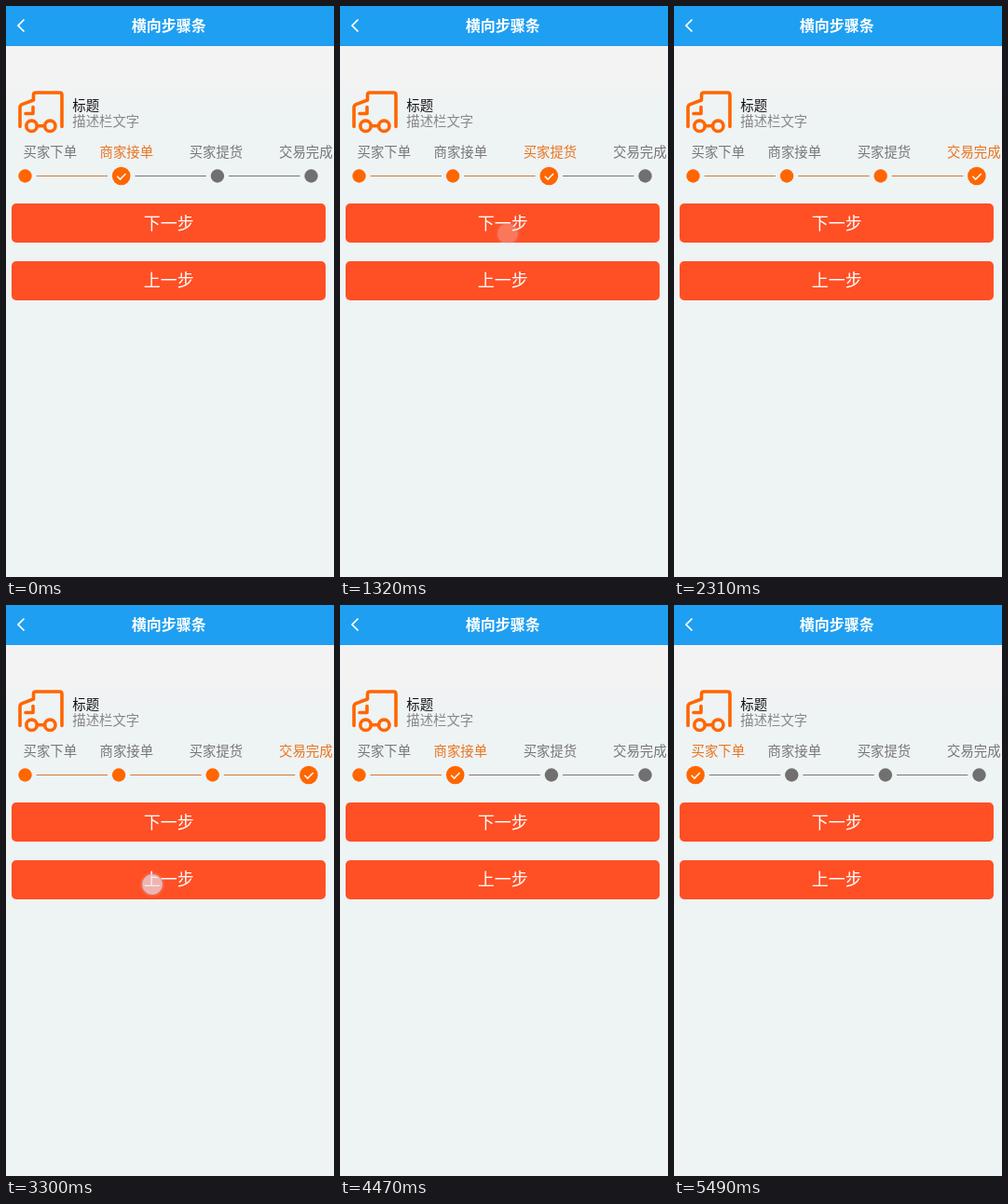
Recreate the animation shown at these times as an HTML page. Size 352 by 613 pixels, loop 6.48 s.

```html
<!DOCTYPE html>
<html lang="zh-CN">
<head>
<meta charset="utf-8">
<title>横向步骤条</title>
<style>
  html, body { margin: 0; width: 100%; height: 100%; overflow: hidden; background: #eef3f4; }
  svg { display: block; }
  text { font: 14.4px "Noto Sans CJK SC", "Noto Sans CJK JP", "Noto Sans CJK", sans-serif; fill: #777; }
  .title { font-size: 16px; font-weight: 700; fill: #fff; }
  .button text { font-size: 18px; fill: #fff; }
  .mid { text-anchor: middle; }
  .truck { fill: none; stroke: #ff6600; stroke-width: 3.6; stroke-linecap: round; stroke-linejoin: round; }
</style>
</head>
<body>
<svg width="352" height="613" viewBox="0 0 352 613">
  <defs>
    <linearGradient id="page" x1="0" y1="0" x2="0" y2="1">
      <stop offset="0.13" stop-color="#f3f3f3"/>
      <stop offset="0.18" stop-color="#eef3f4"/>
    </linearGradient>
  </defs>
  <rect width="352" height="613" fill="url(#page)"/>
  <rect width="352" height="43" fill="#1f9ff1"/>
  <path d="M19.5 14.5L13 21L19.5 27.5" fill="none" stroke="#fff" stroke-width="1.7"/>
  <text class="title mid" x="174.7" y="27.3">横向步骤条</text>

  <g class="truck">
    <path d="M15 129.5V109Q15 106.5 17.3 105.6L29.5 101V95.5Q29.5 93 32 93H57.5Q60 93 60 95.5V129.5"/>
    <path d="M21 115.5H29V108.5M33.5 128.8H41.5"/>
    <circle cx="27.5" cy="128.8" r="5.7"/>
    <circle cx="47.3" cy="128.8" r="5.7"/>
  </g>
  <text x="71.3" y="112" style="fill:#111">标题</text>
  <text x="71.3" y="129" style="fill:#888">描述栏文字</text>

  <g id="labels"></g>
  <g id="track"></g>

  <g class="button">
    <rect x="6" y="212" width="337" height="42" rx="5" fill="#ff4f25"/>
    <text class="mid" x="174.7" y="239.7">下一步</text>
    <rect x="6" y="274" width="337" height="42" rx="5" fill="#ff4f25"/>
    <text class="mid" x="174.7" y="301.4">上一步</text>
  </g>

  <g id="touch" opacity="0">
    <circle r="13" fill="#fff" opacity="0.1"/>
    <circle r="10.3" fill="#e9e0ea" fill-opacity="0.65" stroke="#cfc3d6" stroke-opacity="0.8" stroke-width="1.4"/>
  </g>
</svg>
<script>
const LOOP = 6480, TICK = 30, HOLD = 150;
const ORANGE = '#ff6600', GREY = '#707070';
const STEPS = [['买家下单', 18.5], ['商家接单', 100.5], ['买家提货', 196.7], ['交易完成', 293]];

// Each tap: press time, fade length, position and the step shown afterwards
const TAPS = [
  { at: 1110, fade: 120, x: 180, y: 244.5, step: 2 },
  { at: 2040, fade: 120, x: 179, y: 244, step: 3 },
  { at: 3300, fade: 150, x: 157, y: 300, step: 2 },
  { at: 4170, fade: 150, x: 160, y: 299, step: 1 },
  { at: 5160, fade: 180, x: 160, y: 300, step: 0 }
];

const find = id => document.getElementById(id);
const touch = find('touch');

function add(parent, tag, attrs, text = '') {
  const node = document.createElementNS('http://www.w3.org/2000/svg', tag);
  for (const key in attrs) node.setAttribute(key, attrs[key]);
  node.textContent = text;
  parent.append(node);
  return node;
}

const labels = STEPS.map(([text, x]) => add(find('labels'), 'text', { x, y: 162 }, text));

// Lays the markers out from left to right; the active one is wider
function drawTrack(active) {
  const track = find('track'), y = 182.5, gap = 4.9, span = 76.4;
  track.replaceChildren();
  let x = 13.3;
  STEPS.forEach((_, i) => {
    const r = i === active ? 9.8 : 7.2;
    const cx = x + r;
    add(track, 'circle', { cx, cy: y, r, fill: i <= active ? ORANGE : GREY });
    if (i === active) {
      add(track, 'path', {
        d: `M${cx - 4.5} ${y + 0.3}l3.3 3.3l6 -6.2`,
        fill: 'none', stroke: '#fff', 'stroke-width': 1.5
      });
    }
    x += 2 * r + gap;
    if (i < STEPS.length - 1) {
      add(track, 'rect', { x, y: 182, width: span, height: 1, fill: i < active ? '#d47838' : '#777' });
    }
    x += span + gap;
  });
  labels.forEach((label, i) => { label.style.fill = i === active ? '#e97420' : '#777'; });
}

let shown = -1;
function render(now) {
  const t = now % LOOP;
  let step = 1, opacity = 0;
  for (const tap of TAPS) {
    const since = t - tap.at - HOLD;
    if (since >= TICK) step = tap.step;
    if (since >= -HOLD && since < tap.fade) {
      const faded = since < 0 ? 0 : (Math.floor(since / TICK) + 1) * TICK;
      opacity = 1 - faded / (tap.fade + TICK);
      touch.setAttribute('transform', `translate(${tap.x} ${tap.y})`);
    }
  }
  touch.setAttribute('opacity', opacity);
  if (step !== shown) drawTrack(shown = step);
}

const start = performance.now();
function frame() {
  render(performance.now() - start);
  requestAnimationFrame(frame);
}
frame();
</script>
</body>
</html>
```
